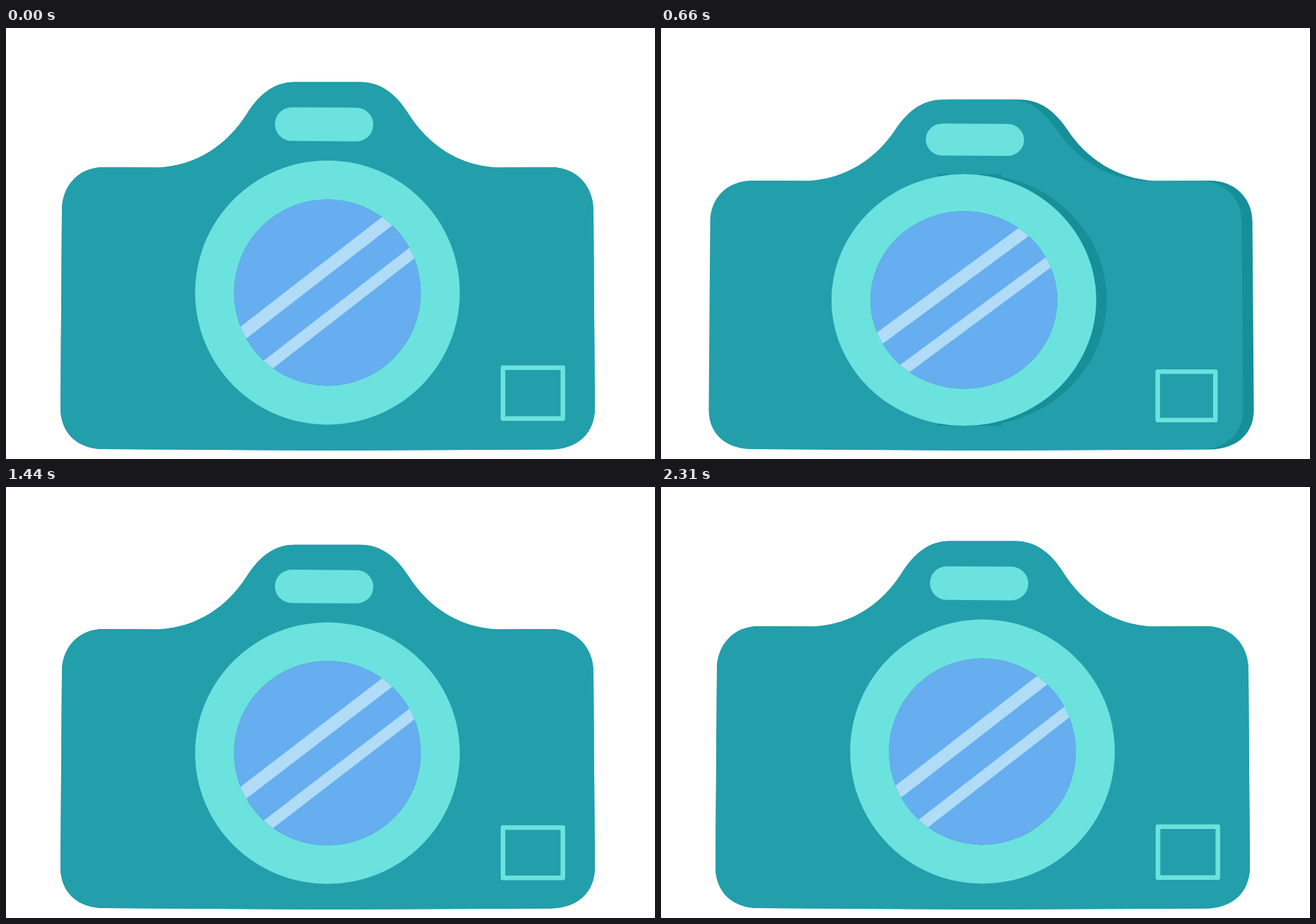
These frames come from a looping animation (917x610 px, 2.34 s). An HTML page with a canvas:

```html
<!DOCTYPE html>
<html lang="en">
<head>
<meta charset="utf-8">
<title>Camera</title>
<style>
  html, body { margin: 0; width: 100%; height: 100%; overflow: hidden; background: #fff; }
  canvas { display: block; width: 917px; height: 610px; }
</style>
</head>
<body>
<canvas id="stage" width="917" height="610"></canvas>
<script>
const ctx = document.getElementById('stage').getContext('2d');
const LOOP = 2340, STEP = 30, FLOOR = 597;
const TEAL = '#229fab', DARK = '#168f99', MINT = '#6ce2de', BLUE = '#66aeef', SHINE = '#b0dcf7';
const LENS = { x: 454.2, y: 374.4, r: 187, hole: 132 };

const body = new Path2D(`M408 76.5 L500 76.5 C531 76.5 552 95 569 122
  C597 166 639 194 692 197.5 L770 197 C806 197 830 224 830 258
  L832 538 C832 573 808 596 770 596.5 L454 598 L138 596
  C101 596 77 573 77 538 L79 258 C79 223 103 197 138 197
  L217 197.5 C270 194 312 166 340 122 C357 95 378 76.5 408 76.5Z`);
const shine = new Path2D(`M291 454 L572 236 L585 249 L300 470Z
  M324 502 L610 280 L617 295 L337 513Z`);

// Eased value between [time, value] keys
function track(keys, t) {
  if (t <= keys[0][0]) return keys[0][1];
  for (let i = 1; i < keys.length; i++) {
    const [t0, a] = keys[i - 1], [t1, b] = keys[i];
    if (t < t1) {
      const u = (t - t0) / (t1 - t0);
      return a + (b - a) * u * u * (3 - 2 * u);
    }
  }
  return keys[keys.length - 1][1];
}

// Rest, turn left, turn right, rest
const turn = (left, right, t) => track(
  [[12, 0], [400, left], [490, left], [875, right], [960, right], [1343, 0]], t);

const stretch = [[12, 1], [400, .9215], [490, .9215], [875, .997], [960, .997],
  [1343, .99], [1430, .99], [1970, 1.022], [2170, 1]];
const backShift = [[75, 0], [450, 13], [835, 0]];
const iris = [[30, 132], [225, 12], [255, 12], [450, 132],
  [720, 132], [915, 12], [945, 12], [1140, 132]];

function fillAt(path, dx, color) {
  ctx.save();
  ctx.translate(dx, 0);
  ctx.fillStyle = color;
  ctx.fill(path);
  ctx.restore();
}

function disc(dx, r, color) {
  ctx.beginPath();
  ctx.arc(LENS.x + dx, LENS.y, r, 0, Math.PI * 2);
  ctx.fillStyle = color;
  ctx.fill();
}

function drawFlash(dx) {
  ctx.save();
  ctx.translate(449.5 + dx, 136.3);
  ctx.rotate(.007);
  ctx.beginPath();
  ctx.roundRect(-69.5, -23.8, 139, 47.6, 23.8);
  ctx.fillStyle = MINT;
  ctx.fill();
  ctx.restore();
}

function drawLens(t) {
  const front = turn(-135, 128.5, t);
  const x0 = turn(-142, 47, t), x1 = turn(-50, 136, t);
  disc(turn(-57.7, 54.5, t), LENS.r, DARK);
  ctx.fillRect(LENS.x + x0, LENS.y - LENS.r, x1 - x0, LENS.r * 2);
  disc(front, LENS.r, MINT);
  disc(front, LENS.hole, TEAL);
  ctx.save();
  disc(front, track(iris, t), BLUE);
  ctx.clip();
  fillAt(shine, front, SHINE);
  ctx.restore();
}

function drawWindow(t) {
  const x0 = 702.2 + turn(-61, 86, t), x1 = 786.8 + turn(-54.5, 69, t);
  ctx.strokeStyle = MINT;
  ctx.lineWidth = 6.5;
  ctx.lineJoin = 'round';
  ctx.strokeRect(x0, 480.8, x1 - x0, 72);
}

function draw(t) {
  ctx.setTransform(1, 0, 0, 1, 0, 0);
  ctx.fillStyle = '#fff';
  ctx.fillRect(0, 0, 917, 610);
  const s = track(stretch, t);
  ctx.setTransform(1, 0, 0, s, 0, FLOOR * (1 - s));
  fillAt(body, track(backShift, t), DARK);
  fillAt(body, turn(-54.5, 54.5, t), TEAL);
  drawFlash(turn(-53, 61, t));
  drawLens(t);
  drawWindow(t);
}

function tick() {
  const t = performance.now() % LOOP;
  draw(Math.floor(t / STEP) * STEP);
  requestAnimationFrame(tick);
}
tick();
</script>
</body>
</html>
```
